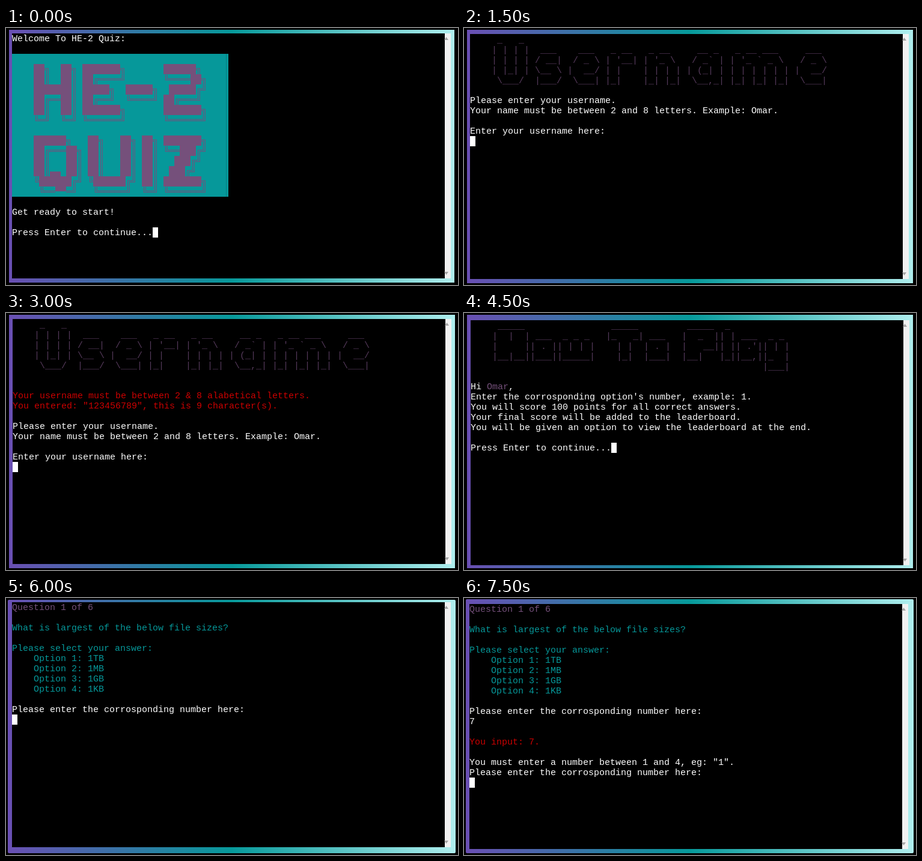
Animation of 752 by 428 pixels, one loop 8000 ms. Source, as an HTML page with a canvas:

```html
<!DOCTYPE html>
<html lang="en">
<head>
<meta charset="utf-8">
<title>Terminal quiz</title>
<style>
  html, body { margin: 0; width: 100%; height: 100%; overflow: hidden; background: #000; }
  canvas { display: block; }
</style>
</head>
<body>
<canvas id="stage" width="752" height="428"></canvas>
<script>
const ctx = document.getElementById('stage').getContext('2d', { alpha: false });
const CELL = 9, ROW = 17, BASELINE = 13, COLS = 80, ROWS = 24, HOLD = 1500, LOOP = 8000;
const WHITE = '#fff', CYAN = '#06989a', MAGENTA = '#75507b', DIM = '#54395a', RED = '#cc0000';

// "~" stands for a backtick inside the lettering.
const lines = art => art.replaceAll('~', '`').split('\n').slice(1, -1);

const banner = lines(`
██╗  ██╗ ███████╗       ██████╗
██║  ██║ ██╔════╝       ╚════██╗
███████║ █████╗  █████╗  █████╔╝
██╔══██║ ██╔══╝  ╚════╝ ██╔═══╝
██║  ██║ ███████╗       ███████╗
╚═╝  ╚═╝ ╚══════╝       ╚══════╝

██████╗   ██╗   ██╗ ██╗ ███████╗
██╔═══██╗ ██║   ██║ ██║ ╚══███╔╝
██║   ██║ ██║   ██║ ██║   ███╔╝
██║▄▄ ██║ ██║   ██║ ██║  ███╔╝
╚██████╔╝ ╚██████╔╝ ██║ ███████╗
 ╚══▀▀═╝   ╚═════╝  ╚═╝ ╚══════╝
`);

const usernameTitle = lines(String.raw`
     _   _
    | | | |  ___    ___   _ __   _ __     __ _   _ __ ___     ___
    | | | | / __|  / _ \ | '__| | '_ \   / _~ | | '_ ~ _ \   / _ \
    | |_| | \__ \ |  __/ | |    | | | | | (_| | | | | | | | |  __/
     \___/  |___/  \___| |_|    |_| |_|  \__,_| |_| |_| |_|  \___|
`);

const howToTitle = lines(String.raw`
     _____                _____         _____  _
    |  |  | ___  _ _ _   |_   _| ___   |  _  || | ___  _ _
    |     || . || | | |    | |  | . |  |   __|| || .'|| | |
    |__|__||___||_____|    |_|  |___|  |__|   |_||__,||_  |
                                                      |___|
`);

const askName = row => {
  print(row, [
    'Please enter your username.',
    'Your name must be between 2 and 8 letters. Example: Omar.',
    '',
    'Enter your username here:'
  ]);
  cursor(row + 4, 0);
};

const askQuestion = () => {
  print(0, ['Question 1 of 6'], MAGENTA);
  print(2, [
    'What is largest of the below file sizes?',
    '',
    'Please select your answer:',
    ...['TB', 'MB', 'GB', 'KB'].map((unit, i) => `    Option ${i + 1}: 1${unit}`)
  ], CYAN);
  print(10, ['Please enter the corrosponding number here:']);
};

const pressEnter = row => {
  print(row, ['Press Enter to continue...']);
  cursor(row, 26);
};

// frame: left, top, right, bottom of the gradient; x, y: terminal corner
const scenes = [
  { frame: [5, 3, 746, 424], x: 10, y: 9, draw() {
    print(0, ['Welcome To HE-2 Quiz:']);
    drawBanner();
    print(17, ['Get ready to start!']);
    pressEnter(19);
  } },
  { frame: [5, 3, 747, 425], x: 10, y: 10, draw() {
    drawTitle(usernameTitle);
    askName(6);
  } },
  { frame: [5, 3, 747, 425], x: 11, y: 10, draw() {
    drawTitle(usernameTitle);
    print(7, [
      'Your username must be between 2 & 8 alabetical letters.',
      'You entered: "123456789", this is 9 character(s).'
    ], RED);
    askName(10);
  } },
  { frame: [5, 3, 747, 425], x: 11, y: 12, draw() {
    drawTitle(howToTitle);
    print(6, [
      'Hi     ,',
      "Enter the corrosponding option's number, example: 1.",
      'You will score 100 points for all correct answers.',
      'Your final score will be added to the leaderboard.',
      'You will be given an option to view the leaderboard at the end.'
    ]);
    print(6, ['   Omar'], MAGENTA);
    pressEnter(12);
  } },
  { frame: [3, 3, 748, 425], radius: 2, x: 10, y: 7, draw() {
    askQuestion();
    cursor(11, 0);
  } },
  { frame: [3, 2, 748, 425], radius: 2, x: 9, y: 10, draw() {
    askQuestion();
    print(11, ['7']);
    print(13, ['You input: 7.'], RED);
    print(15, [
      'You must enter a number between 1 and 4, eg: "1".',
      'Please enter the corrosponding number here:'
    ]);
    cursor(17, 0);
  } }
];

function rect(x, y, w, h, color) {
  ctx.fillStyle = color;
  ctx.fillRect(x, y, w, h);
}

function print(row, texts, color = WHITE, baseline = BASELINE) {
  ctx.fillStyle = color;
  texts.forEach((text, i) => ctx.fillText(text, 0, (row + i) * ROW + baseline));
}

// The thin strokes of the lettering sit slightly lower and darker than text.
function drawTitle(art) {
  print(0, art, DIM, BASELINE + 1);
}

function cursor(row, col) {
  rect(col * CELL, row * ROW, CELL, ROW, WHITE);
}

function drawBanner() {
  rect(0, 2 * ROW, 40 * CELL, 14 * ROW, CYAN);
  rect(356, 2 * ROW, 1, 14 * ROW, 'rgba(0,0,0,.15)');
  ctx.fillStyle = MAGENTA;
  banner.forEach((text, i) => [...text].forEach((char, j) => {
    const x = (j + 4) * CELL, y = (i + 3) * ROW;
    if (char === '█') ctx.fillRect(x, y, CELL, ROW);
    else if (char === '▄') ctx.fillRect(x, y + 9, CELL, 8);
    else if (char === '▀') ctx.fillRect(x, y, CELL, 8);
    else ctx.fillText(char, x, y + BASELINE);
  }));
}

function triangle(x, base, tip) {
  ctx.beginPath();
  ctx.moveTo(x - 3.5, base);
  ctx.lineTo(x + 3.5, base);
  ctx.lineTo(x, tip);
  ctx.fill();
}

function drawWindow({ frame: [left, top, right, bottom], radius = 0, x, y }) {
  const width = COLS * CELL, height = ROWS * ROW;
  const gradient = ctx.createLinearGradient(left, 0, right, 0);
  ['#6a4fb3', '#079a9b', '#afeeee'].forEach((c, i) => gradient.addColorStop(i / 2, c));
  rect(0, 0, 752, 428, '#000');
  ctx.fillStyle = gradient;
  ctx.beginPath();
  ctx.roundRect(left, top, right - left, bottom - top, radius);
  ctx.fill();
  rect(x, y, width, height, '#000');
  rect(x + width, y, 10, height, '#f1f1f1');
  ctx.fillStyle = '#a3a3a3';
  triangle(x + width + 2.5, y + 11, y + 6);
  triangle(x + width + 2.5, y + height - 11, y + height - 6);
}

function render() {
  const scene = scenes[Math.floor(performance.now() % LOOP / HOLD)];
  ctx.font = '15px "Liberation Mono", monospace';
  drawWindow(scene);
  ctx.save();
  ctx.translate(scene.x, scene.y);
  scene.draw();
  ctx.restore();
  requestAnimationFrame(render);
}
render();
</script>
</body>
</html>
```
